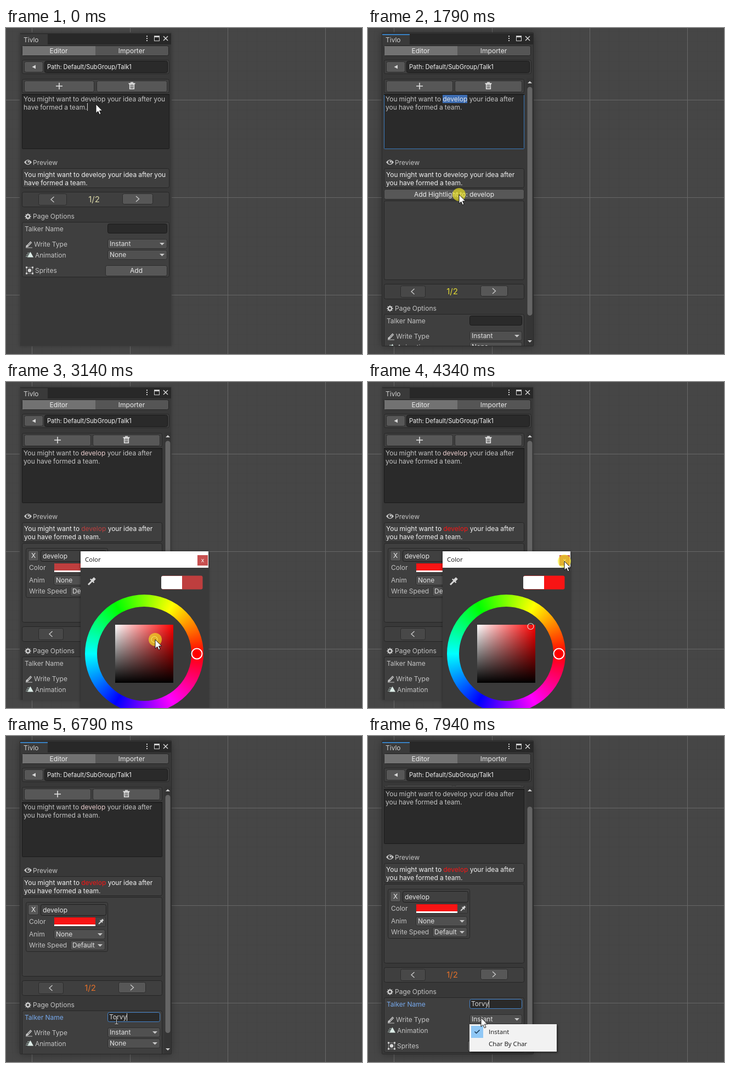
These frames come from a looping animation (649 px wide and 595 px high, 8000 ms). An HTML page with a canvas:

```html
<!DOCTYPE html>
<html lang="en">
<head>
<meta charset="utf-8">
<title>Dialogue editor</title>
<style>
html, body { margin: 0; width: 100%; height: 100%; overflow: hidden; background: #464646; }
canvas { display: block; width: 649px; height: 595px; }
</style>
</head>
<body>
<canvas id="stage" width="649" height="595"></canvas>
<script>
const c = document.getElementById('stage').getContext('2d');
const LOOP = 8000;
const UI = 'Inter, sans-serif', SYS = '"Open Sans", sans-serif';
const LABEL = '#c4c4c4', BRIGHT = '#ececec', BLUE = '#3a79bb';

// When things happen (ms)
const AT = { focus: 450, select: 800, card: 1880, popup: 2440, picker: 2530,
  drag: 3080, drop: 3500, close: 4420, field: 5260, scroll: 6900, menu: 7880 };
const KEYS = [5870, 6100, 6180, 6410, 6510];
const NAME = 'Torvy';
const CLICKS = [[450, 560], [700, 1150], [1760, 1900], [2380, 2580], [3080, 3600],
  [4300, 4420], [5260, 5420], [7720, 7860]];
// Pointer stops: time, x, y
const PATH = [[100, 164, 139], [420, 182, 126], [1150, 182, 126], [1640, 166, 304],
  [2120, 166, 304], [2360, 136, 340], [2760, 136, 340], [3060, 272, 470], [3150, 272, 470],
  [3480, 298, 446], [3600, 298, 446], [4250, 358, 327], [4700, 358, 327], [5150, 201, 519],
  [6790, 201, 519], [7170, 166, 512], [7430, 166, 512], [7700, 206, 514]];

function pointer(t) {
  if (t <= PATH[0][0]) return PATH[0].slice(1);
  for (let i = 1; i < PATH.length; i++) {
    const [t0, x0, y0] = PATH[i - 1], [t1, x1, y1] = PATH[i];
    if (t < t1) {
      const u = (t - t0) / (t1 - t0), e = u * u * (3 - 2 * u);
      return [x0 + (x1 - x0) * e, y0 + (y1 - y0) * e];
    }
  }
  return PATH[PATH.length - 1].slice(1);
}

function fill(x, y, x2, y2, color) {
  c.fillStyle = color;
  c.fillRect(x, y, x2 - x, y2 - y);
}

function box(x, y, x2, y2, color, edge, r = 3) {
  c.beginPath();
  c.roundRect(x + .5, y + .5, x2 - x - 1, y2 - y - 1, r);
  c.fillStyle = color;
  c.fill();
  if (edge) {
    c.strokeStyle = edge;
    c.lineWidth = 1;
    c.stroke();
  }
}

// y is the middle of the text line
function text(s, x, y, color = LABEL, size = 12, align = 'left', family = UI) {
  c.font = size + 'px ' + family;
  c.wordSpacing = family === UI ? '-0.3px' : '0px';
  c.textAlign = align;
  c.fillStyle = color;
  c.fillText(s, x, y + Math.round(size * .36));
  return c.measureText(s).width;
}

function line(color, width, ...pts) {
  c.beginPath();
  for (let i = 0; i < pts.length; i += 2) c.lineTo(pts[i], pts[i + 1]);
  c.strokeStyle = color;
  c.lineWidth = width;
  c.stroke();
}

function poly(color, ...pts) {
  c.beginPath();
  for (let i = 0; i < pts.length; i += 2) c.lineTo(pts[i], pts[i + 1]);
  c.closePath();
  c.fillStyle = color;
  c.fill();
}

function disc(x, y, r, color, edge, width = 1) {
  c.beginPath();
  c.arc(x, y, r, 0, 7);
  if (color) { c.fillStyle = color; c.fill(); }
  if (edge) { c.strokeStyle = edge; c.lineWidth = width; c.stroke(); }
}

// Rectangle with a soft dark halo
function raised(x, y, x2, y2, color, blur, alpha, offset = 0) {
  c.save();
  c.shadowColor = `rgba(0,0,0,${alpha})`;
  c.shadowBlur = blur;
  c.shadowOffsetX = c.shadowOffsetY = offset;
  fill(x, y, x2, y2, color);
  c.restore();
}

const panel = (x, y, x2, y2) => box(x, y, x2, y2, '#3f3f3f', '#262626');
const input = (x, y, x2, y2, edge = '#191919') => box(x, y, x2, y2, '#2a2a2a', edge);

function button(x, y, x2, y2, s, color = '#575757') {
  box(x, y, x2, y2, color, '#2c2c2c');
  if (s) text(s, (x + x2) / 2, Math.round((y + y2) / 2), BRIGHT, 12, 'center');
}

function dropdown(x, y, x2, y2, s) {
  box(x, y, x2, y2, '#505050', '#2e2e2e');
  const m = (y + y2) / 2;
  text(s, x + 4, m, '#e2e2e2');
  poly('#c8c8c8', x2 - 14, m - 2, x2 - 5, m - 2, x2 - 9.5, m + 2.5);
}

function backdrop() {
  fill(0, 0, 649, 595, '#464646');
  for (let i = -3; i < 37; i++) {
    const v = Math.round(47 + i * 17.83), h = Math.round(131 + (i - 5) * 17.83);
    fill(v, 0, v + 1, 595, 'rgba(0,0,0,.025)');
    fill(0, h, 649, h + 1, 'rgba(0,0,0,.025)');
  }
  for (const x of [47, 226, 404, 582]) fill(x, 0, x + 1, 595, '#686868');
  for (const y of [131, 309, 487]) fill(0, y, 649, y + 1, '#686868');
}

function chrome(active) {
  raised(26, 10, 301, 580, '#383838', active ? 14 : 7, active ? .4 : .3);
  box(25, 8, 302, 581, '#383838', active ? '#2a2a2a' : '#3e3e3e', 1);
  fill(26, 10, 301, 30, '#282828');
  fill(26, 11, 76, 31, '#3a3a3a');
  if (active) fill(26, 11, 76, 13, '#3a82c4');
  text('Tivlo', 32, 22, '#d2d2d2');
  for (const y of [14, 18, 22]) fill(256, y, 258, y + 2, '#d0d0d0');
  c.strokeStyle = '#d0d0d0';
  c.lineWidth = 1;
  c.strokeRect(270.5, 14.5, 9, 9);
  fill(270, 14, 280, 17, '#d0d0d0');
  line('#d8d8d8', 1.5, 287, 15, 295, 23);
  line('#d8d8d8', 1.5, 295, 15, 287, 23);

  box(29, 32, 297, 51, '#555', '#242424');
  fill(30, 33, 163, 50, '#727272');
  text('Editor', 96, 42, BRIGHT, 12, 'center');
  text('Importer', 229, 42, BRIGHT, 12, 'center');

  panel(29, 58, 298, 84);
  button(33, 61, 68, 81);
  poly('#d8d8d8', 47.5, 71, 54, 67.5, 54, 74.5);
  input(70, 60, 295, 82);
  text('Path: Default/SubGroup/Talk1', 75, 71, '#f2f2f2', 11.1);
}

function trash(x, y) {
  c.strokeStyle = '#e8e8e8';
  c.lineWidth = 1.6;
  c.strokeRect(x - 3.8, y - 2.5, 7.6, 8.5);
  line('#e8e8e8', 1.8, x - 6, y - 3.5, x + 6, y - 3.5);
  line('#e8e8e8', 1.6, x - 2.5, y - 5.5, x + 2.5, y - 5.5);
  for (const d of [-1.3, 1.3]) line('#e8e8e8', 1.2, x + d, y - 1, x + d, y + 4);
}

function eye(x, y) {
  c.beginPath();
  c.moveTo(x - 7, y);
  c.quadraticCurveTo(x, y - 9, x + 7, y);
  c.quadraticCurveTo(x, y + 9, x - 7, y);
  c.fillStyle = '#c8c8c8';
  c.fill();
  disc(x, y, 3.3, '#383838');
  disc(x + 1, y - 1, 1.6, '#d0d0d0');
}

function cog(x, y) {
  for (let a = 0; a < 8; a++) {
    const dx = Math.cos(a * Math.PI / 4), dy = Math.sin(a * Math.PI / 4);
    line('#cacaca', 2, x + dx * 3, y + dy * 3, x + dx * 5.5, y + dy * 5.5);
  }
  disc(x, y, 3.1, null, '#cacaca', 2.2);
}

function pencil(x, y) {
  line('#d0d0d0', 3.6, x - 3, y + 3, x + 4, y - 4.5);
  line('#383838', 1, x - 2, y + 2, x + 3.5, y - 4);
  poly('#d0d0d0', x - 6, y + 5.5, x - 5, y + 1, x - 1.5, y + 4.5);
  line('#c0c0c0', 1, x - 6, y + 6, x + 6, y + 6);
}

function speedShape(x, y) {
  poly('#dcebe6', x - 4, y + 4.5, x + 1.5, y - 5.5, x + 7, y + 4.5);
  line('#b4cac4', 1, x - 4, y - 3, x, y - 3);
  line('#b4cac4', 1, x - 6, y, x - 1, y);
  line('#b4cac4', 1, x - 7, y + 3, x - 2, y + 3);
}

function spriteIcon(x, y) {
  c.strokeStyle = '#8c8c8c';
  c.lineWidth = 1;
  c.strokeRect(x - 5.5, y - 5.5, 11, 11);
  for (const dx of [-5.5, 5.5]) for (const dy of [-5.5, 5.5])
    fill(x + dx - 1.5, y + dy - 1.5, x + dx + 1.5, y + dy + 1.5, '#d2d2d2');
  disc(x, y, 3.2, '#d8d8d8');
}

function dropper(x, y, k = 1) {
  line('#d6d6d6', 2 * k, x - 4 * k, y + 4 * k, x + 1.5 * k, y - 1.5 * k);
  line('#d6d6d6', 1.5 * k, x - 1.5 * k, y - 3 * k, x + 3 * k, y + 1.5 * k);
  line('#d6d6d6', 3.4 * k, x + 1 * k, y - 1 * k, x + 4 * k, y - 4 * k);
}

// Two lines of running text with one word in its own colour
function passage(x, y, wide, color, wordColor, selected) {
  const head = 'You might want to ', word = 'develop';
  const tail = wide ? ' your idea after you' : ' your idea after';
  const x1 = x + text(head, x, y, color);
  const w = c.measureText(word).width;
  if (selected) fill(Math.round(x1), y - 8, Math.round(x1 + w), y + 7, '#3d6db3');
  text(word, x1, y, wordColor);
  text(tail, x1 + w, y, color);
  return text(wide ? 'have formed a team.' : 'you have formed a team.', x, y + 15, color);
}

function card(color) {
  panel(36, 303, 186, 394);
  button(40, 307, 60, 327, 'X');
  box(63, 307, 183, 328, '#404040', '#1e1e1e');
  text('develop', 67, 318, '#e6e6e6');
  text('Color', 42, 339);
  box(88, 330, 182, 348, '#444', '#303030', 1);
  fill(88, 331, 163, 344, color);
  fill(88, 344, 163, 347, '#fff');
  dropper(173, 339);
  text('Anim', 42, 362);
  dropdown(87, 353, 181, 371, 'None');
  text('Write Speed', 42, 382);
  dropdown(117, 373, 181, 391, 'Default');
}

function options(p, R, t) {
  const wide = R === 298, I = R - 4, focused = t >= AT.field;
  panel(29, p, R, p + 28);
  const [a, b, d] = wide ? [111, 212, 268] : [105, 205, 255];
  button(59, p + 3, a, p + 25, '', '#484848');
  button(b, p + 3, d, p + 23);
  const m = (59 + a) / 2, n = (b + d) / 2;
  line('#c8c8c8', 1.4, m + 2.5, p + 9, m - 3, p + 14, m + 2.5, p + 19);
  line('#c8c8c8', 1.4, n - 3, p + 8, n + 2.5, p + 13, n - 3, p + 18);
  const tint = t < AT.select ? '#dad7a8' : t < AT.picker ? '#e2da35' : '#e2702a';
  text('1/2', wide ? 160.5 : 153.5, p + 14, tint, 15, 'center');

  cog(40, p + 45);
  text('Page Options', 49, p + 45);
  panel(29, p + 55, R, p + 156);
  text('Talker Name', 34, p + 68, focused ? '#77a9ec' : LABEL);
  input(185, p + 58, I, p + 76, focused ? '#4585cc' : undefined);
  if (focused) {
    const typed = NAME.slice(0, KEYS.filter(k => t >= k).length);
    const w = text(typed, 188, p + 67, '#d6d6d6');
    const x = Math.round(188 + w);
    fill(x, p + 60, x + 1, p + 74, '#e0e0e0');
  }
  pencil(42, p + 96);
  text('Write Type', 51, p + 96);
  dropdown(185, p + 86, I, p + 104, 'Instant');
  speedShape(43, p + 115);
  text('Animation', 53, p + 116);
  dropdown(185, p + 106, I, p + 124, 'None');
  spriteIcon(43, p + 143.5);
  text('Sprites', 53, p + 144);
  button(181, p + 134, I, p + 154, 'Add');
}

function content(t, color) {
  const wide = t < AT.select, carded = t >= AT.card, picked = t >= AT.picker;
  const R = wide ? 298 : 285, scroll = t >= AT.scroll ? 24 : 0;
  c.save();
  c.beginPath();
  c.rect(26, 91, 275, 489);
  c.clip();
  c.translate(0, -scroll);

  panel(29, 93, R, 119);
  const [a, b] = wide ? [161, 165] : [155, 158];
  button(33, 96, a, 117);
  button(b, 96, R - 4, 117);
  const m = (33 + a) / 2, n = (b + R - 4) / 2;
  line('#e0e0e0', 1.6, m - 6, 106, m + 6, 106);
  line('#e0e0e0', 1.6, m, 100, m, 112);
  trash(n, 105);

  const editing = t >= AT.focus && t < AT.picker;
  box(29, 121, R, 221, '#2a2a2a', editing ? BLUE : '#1b1b1b', 1);
  fill(29, 121, R, 122, '#0e0e0e');
  const selected = !wide && !picked;
  const word = selected ? '#e4e4e4' : picked && !scroll ? '#e8cccc' : LABEL;
  const w = passage(32, 130, wide, LABEL, word, selected);
  if (t < AT.focus) fill(Math.round(32 + w), 137, Math.round(33 + w), 151, '#d8d8d8');

  eye(40, 245);
  text('Preview', 49, 246);
  panel(29, 256, R, 292);
  passage(33, 268, wide, '#f2f2f2', picked ? color : '#f2f2f2');

  let p = 299;
  if (carded) {
    panel(29, 294, R, 439);
    card(color);
    p = 446;
  } else if (!wide) {
    button(29, 294, R, 313, 'Add Hightlight to: develop');
    panel(29, 315, R, 460);
    p = 467;
  }
  options(p, R, t);
  c.restore();

  if (!wide) {
    const total = carded ? 511 : 532, top = 107 + scroll * 457 / total;
    fill(289, 92, 301, 580, '#353535');
    box(290, top, 300, top + 457 * 487 / total, '#656565', null, 5);
    poly('#d0d0d0', 291, 101, 299, 101, 295, 97);
    poly('#d0d0d0', 291, 570, 299, 570, 295, 574);
  }
}

function picker(color, hx, hy, ready) {
  if (ready) raised(136, 309, 369, 600, '#3a3a3a', 5, .4);
  fill(136, 309, 369, 339, '#fff');
  text('Color', 144, 324, ready ? '#111' : '#a0913c', 11.5, 'left', SYS);
  fill(349, 316, 368, 335, ready ? '#c75050' : '#dedede');
  text('x', 358.5, 325, ready ? '#fff' : '#c8c8c8', 10.5, 'center', SYS);
  if (!ready) {
    fill(136, 339, 369, 595, 'rgba(30,30,30,.08)');
    fill(368, 339, 370, 595, 'rgba(0,0,0,.15)');
    return;
  }
  dropper(156, 364, 1.5);
  box(283, 353, 359, 379, color, null, 3);
  c.beginPath();
  c.roundRect(283, 354, 38, 24, [3, 0, 0, 3]);
  c.fillStyle = '#fff';
  c.fill();

  const hue = c.createConicGradient(0, 252, 496);
  for (let i = 0; i <= 6; i++) hue.addColorStop(i / 6, `hsl(${360 - i * 60}, 100%, 50%)`);
  disc(252, 496, 97, null, hue, 22);
  disc(348, 496, 9.5, '#f00', '#fff', 2);

  const sat = c.createLinearGradient(199, 0, 305, 0);
  sat.addColorStop(0, '#fff');
  sat.addColorStop(1, '#f00');
  fill(199, 443, 305, 549, sat);
  const val = c.createLinearGradient(0, 443, 0, 549);
  val.addColorStop(0, 'rgba(0,0,0,0)');
  val.addColorStop(1, '#000');
  fill(199, 443, 305, 549, val);
  disc(hx, hy, 5.5, null, '#e8dcd0', 1.2);
}

function menu() {
  raised(185, 526, 344, 576, '#f2f2f2', 4, .45, 2);
  fill(188, 529, 210, 551, '#90c8f6');
  line('#16324f', 1.5, 194.5, 539.5, 197.5, 542.5, 203.5, 536.5);
  text('Instant', 220, 540, '#111', 11.5, 'left', SYS);
  text('Char By Char', 220, 562, '#111', 11.5, 'left', SYS);
}

function cursor(t) {
  const [x, y] = pointer(t);
  if (CLICKS.some(([a, b]) => t >= a && t < b)) disc(x, y, 12, 'rgba(246,236,28,.63)');
  if (t >= 5120 && t < 6850) {
    for (const [col, w] of [['#222', 2.5], ['#d8d8d8', 1]]) {
      line(col, w, x + .5, y - 6, x + .5, y + 7);
      line(col, w, x - 2.5, y - 6.5, x + 3.5, y - 6.5);
      line(col, w, x - 2.5, y + 6.5, x + 3.5, y + 6.5);
    }
    return;
  }
  c.save();
  c.translate(x, y);
  poly('#fff', 0, 0, 0, 16.5, 3.8, 13, 6.3, 18.8, 9, 17.6, 6.5, 12, 11.6, 12);
  c.strokeStyle = '#111';
  c.lineWidth = 1;
  c.stroke();
  c.restore();
}

function draw(t) {
  const open = t >= AT.popup && t < AT.close;
  const active = t >= AT.focus && !(t >= AT.picker && t < AT.close);
  let color = '#fff', hx = 199, hy = 443;
  if (t >= AT.drag) {
    [hx, hy] = pointer(Math.min(t, AT.drop));
    hx -= 1.5;
    const s = (hx - 199) / 106, v = 1 - (hy - 443) / 106;
    const low = Math.round(255 * v * (1 - s));
    color = `rgb(${Math.round(255 * v)}, ${low}, ${low})`;
  }
  backdrop();
  chrome(active);
  content(t, color);
  if (open) picker(color, hx, hy, t >= AT.picker);
  if (t >= AT.menu) menu();
  cursor(t);
}

function tick() {
  draw(performance.now() % LOOP);
  requestAnimationFrame(tick);
}
tick();
</script>
</body>
</html>
```
